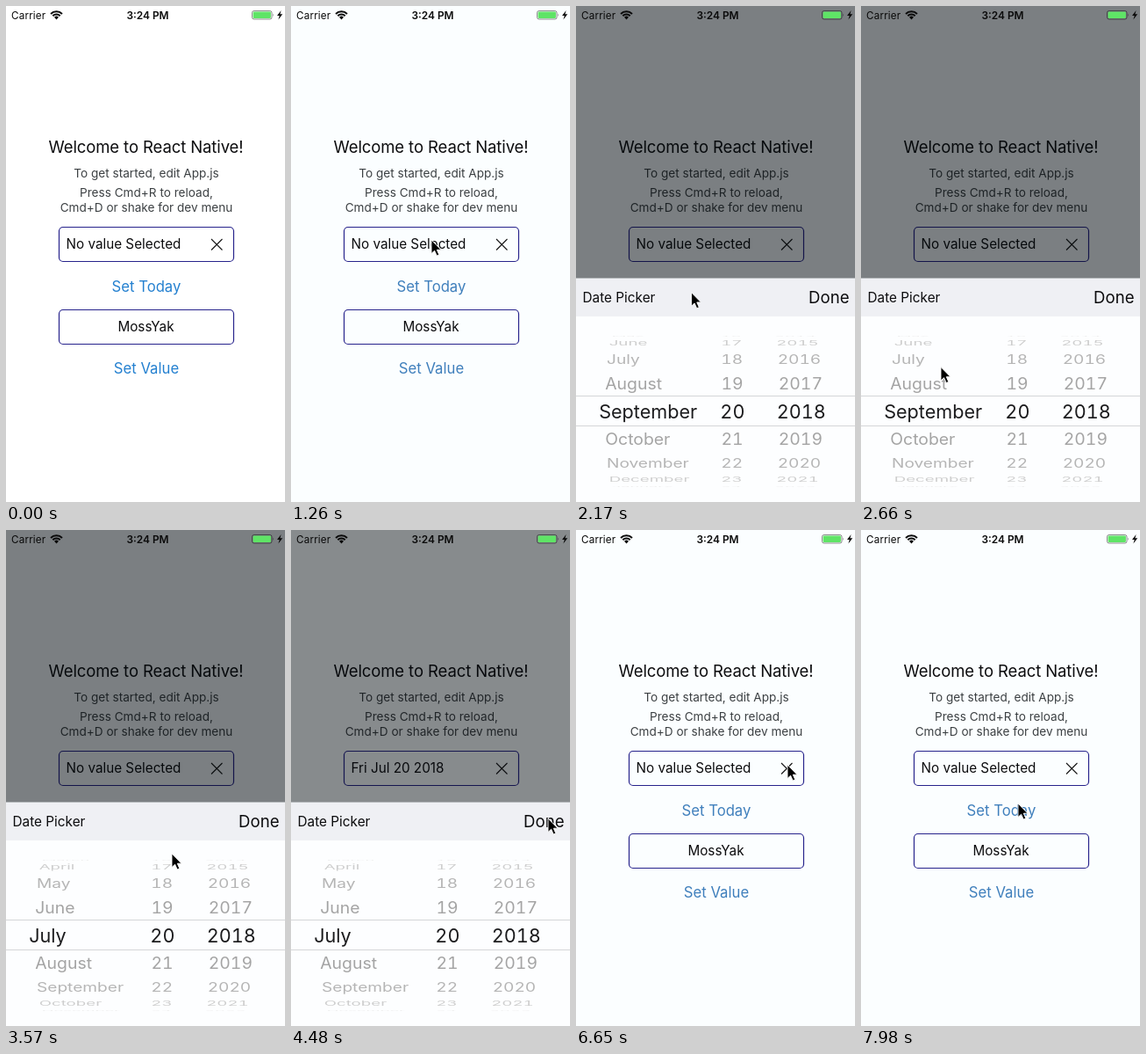
An HTML page that plays this animation: 318x564 px, repeating every 8000 ms.

```html
<!DOCTYPE html>
<html lang="en">
<head>
<meta charset="utf-8">
<title>Date picker demo</title>
<style>
  html, body { margin: 0; width: 100%; height: 100%; overflow: hidden; background: #fff; }
  svg { display: block; width: 318px; height: 564px; font-family: Inter, "Liberation Sans", sans-serif; }
  text { white-space: pre; }
  .mid { text-anchor: middle; }
  .note { font-size: 13.6px; fill: #3c4043; }
  .field { font-size: 15.25px; fill: #0c0c0e; }
  .link { font-size: 16.7px; }
  .wheel { font-size: 19.5px; font-variant-numeric: tabular-nums; }
</style>
</head>
<body>
<svg viewBox="0 0 318 564">
  <defs>
    <clipPath id="outside"><path d="M0 353H318V443H0ZM0 478H318V564H0Z"/></clipPath>
    <clipPath id="inside"><rect y="444" width="318" height="33"/></clipPath>
  </defs>

  <rect id="page" width="318" height="564"/>
  <text class="mid" x="159.5" y="167" font-size="18.5" letter-spacing="-.1" fill="#0c0c0e">Welcome to React Native!</text>
  <g class="mid note">
    <text x="160" y="195.2">To get started, edit App.js</text>
    <text x="160" y="217.2">Press Cmd+R to reload,</text>
    <text x="160" y="234.2">Cmd+D or shake for dev menu</text>
  </g>
  <g fill="none" stroke="#27238c" stroke-width="1.2">
    <rect x="60.5" y="251.5" width="199" height="39" rx="4.5"/>
    <rect x="60.5" y="345.5" width="199" height="39" rx="4.5"/>
  </g>
  <text id="value" class="field" x="68.5" y="276.4"></text>
  <path d="M234 265L246.5 277.5M246.5 265L234 277.5" stroke="#151515" stroke-width="1.1"/>
  <text class="mid field" x="159.5" y="370.2">MossYak</text>
  <g id="links" class="mid link">
    <text x="160" y="324.5">Set Today</text>
    <text x="160" y="418">Set Value</text>
  </g>
  <rect id="shade" width="318" height="564" fill="#00060a"/>

  <g id="status" fill="#0a0a0a">
    <text x="6" y="14.7" font-size="11.7" letter-spacing=".15">Carrier</text>
    <text class="mid" x="161.5" y="14.7" font-size="11.9" font-weight="600">3:24 PM</text>
    <g id="wifi" fill="none" stroke="#0a0a0a" stroke-width="2"></g>
    <path d="M57.5 15.5L55 12.7A3.6 3.6 0 0 1 60 12.7Z"/>
    <rect x="280.5" y="5.500" width="22.5" height="9.5" rx="2.2" fill="none" stroke="#000" stroke-opacity=".45"/>
    <rect x="281.6" y="6.5" width="20.3" height="7.5" rx="1.2" fill="#5fe466"/>
    <path d="M304.3 8.5Q306 10.2 304.3 12Z" fill-opacity=".5"/>
    <path d="M313.6 5L309 11H311.7L310.4 15.5L315.2 9.2H312.4Z"/>
  </g>

  <g id="sheet">
    <rect y="309" width="318" height="44" fill="#eff0f4"/>
    <rect y="353" width="318" height="212" fill="#fdfeff"/>
    <path d="M0 309.5H318" stroke="#b4b7ba"/>
    <text x="7.5" y="337.1" font-size="15.35" fill="#0c0c0e">Date Picker</text>
    <text x="311.5" y="338" font-size="18.6" text-anchor="end" fill="#0c0c0e">Done</text>
    <path d="M0 443.5H318M0 477.5H318" stroke="#d4d6d8"/>
    <g id="rim" class="wheel" clip-path="url(#outside)"></g>
    <g id="lens" class="wheel" clip-path="url(#inside)" fill="#1c1c1e"></g>
  </g>

  <path id="cursor" d="M0 0V15.5L3.6 12.2L6.2 18L8.8 16.9L6.3 11.2H11Z"
        fill="#000" stroke="#fff" stroke-width=".9" stroke-linejoin="round"/>
</svg>

<script>
const LOOP = 8000;
const MID_X = 159, MID_Y = 461;   // centre of the wheels
const RADIUS = 86, STEP = .375;   // cylinder size, angle between rows
const ZOOM = 1.11, ZOOM_ROW = 34.5;
const MONTHS = ["January", "February", "March", "April", "May", "June", "July",
  "August", "September", "October", "November", "December"];

const el = id => document.getElementById(id);
const lerp = (a, b, k) => a + (b - a) * k;
const span = (t, a, b) => Math.min(1, Math.max(0, (t - a) / (b - a)));
const smooth = k => k * k * (3 - 2 * k);
const easeOut = k => 1 - (1 - k) ** 3;

const columns = [
  { x: 32.6, hub: 91.5, anchor: "start", label: i => MONTHS[(i + 12) % 12] },
  { x: 190.7, hub: 175, anchor: "end", label: i => 20 + i },
  { x: 231, hub: 252, anchor: "start", label: i => 2018 + i }
];

// time, x, y of the pointer at each stop
const stops = [
  [280, 186, 538], [1030, 160, 266], [1950, 160, 266], [2450, 91, 410.5],
  [2780, 91, 410.5], [3150, 95, 472], [3220, 95, 472], [3560, 189, 368],
  [3680, 189, 368], [4300, 293, 328], [5390, 293, 328], [6100, 241, 267],
  [6700, 241, 267], [7400, 179, 311], [8000, 179, 311]
];

el("wifi").innerHTML = [5.8, 9].map(r => {
  const w = r * .72, y = 15.2 - r * .69;
  return `<path d="M${57.5 - w} ${y}A${r} ${r} 0 0 1 ${57.5 + w} ${y}"/>`;
}).join("");

function row(col, i, move, fill = "") {
  return `<text transform="${move}" x="${col.x - MID_X}" y="6.9" text-anchor="${col.anchor}"${fill}>${col.label(i)}</text>`;
}

let drawn = null;
function drawWheels(month) {
  if (month === drawn) return;
  drawn = month;
  let rim = "", lens = "";
  columns.forEach((col, c) => {
    const pos = c ? 0 : month;
    for (let i = Math.ceil(pos - 4.1); i <= pos + 4.1; i++) {
      const d = i - pos, depth = Math.cos(d * STEP);
      const size = 1 - .07 * (1 - depth);
      const y = MID_Y + RADIUS * Math.sin(d * STEP);
      const grey = Math.round(158 + 85 * (1 - depth));
      rim += row(col, i, `translate(${MID_X} ${y}) scale(${size} ${size * depth})`,
        ` fill="rgb(${grey},${grey},${grey})"`);
      if (Math.abs(d) < 1) {
        const x = col.hub + (MID_X - col.hub) * ZOOM;
        lens += row(col, i, `translate(${x} ${MID_Y + d * ZOOM_ROW}) scale(${ZOOM})`);
      }
    }
  });
  el("rim").innerHTML = rim;
  el("lens").innerHTML = lens;
}

function placeCursor(t) {
  const n = stops.findIndex(s => s[0] > t);
  el("cursor").setAttribute("visibility", n > 0 ? "visible" : "hidden");
  if (n < 1) return;
  const [t0, x0, y0] = stops[n - 1], [t1, x1, y1] = stops[n];
  const k = smooth(span(t, t0, t1));
  el("cursor").setAttribute("transform", `translate(${lerp(x0, x1, k)} ${lerp(y0, y1, k)})`);
}

function render(t) {
  const fresh = t < 1120;
  el("page").setAttribute("fill", fresh ? "#fff" : "#fbfeff");
  el("links").setAttribute("fill", fresh ? "#2480d0" : "#3f7fbc");

  const open = easeOut(span(t, 1350, 1995));
  const close = smooth(span(t, 4480, 4860));
  const drop = 255 * (1 - open + close);
  el("sheet").setAttribute("transform", `translate(0 ${drop})`);
  el("sheet").setAttribute("visibility", drop < 255 ? "visible" : "hidden");

  const dim = .51 * (span(t, 1780, 2160) - span(t, 4450, 4780));
  el("shade").setAttribute("fill-opacity", dim);

  el("value").textContent = t >= 4480 && t < 6300 ? "Fri Jul 20 2018" : "No value Selected";
  drawWheels(8 - 2 * smooth(span(t, 2780, 3150)));
  placeCursor(t);
}

function tick() {
  render(performance.now() % LOOP);
  requestAnimationFrame(tick);
}
tick();
</script>
</body>
</html>
```
